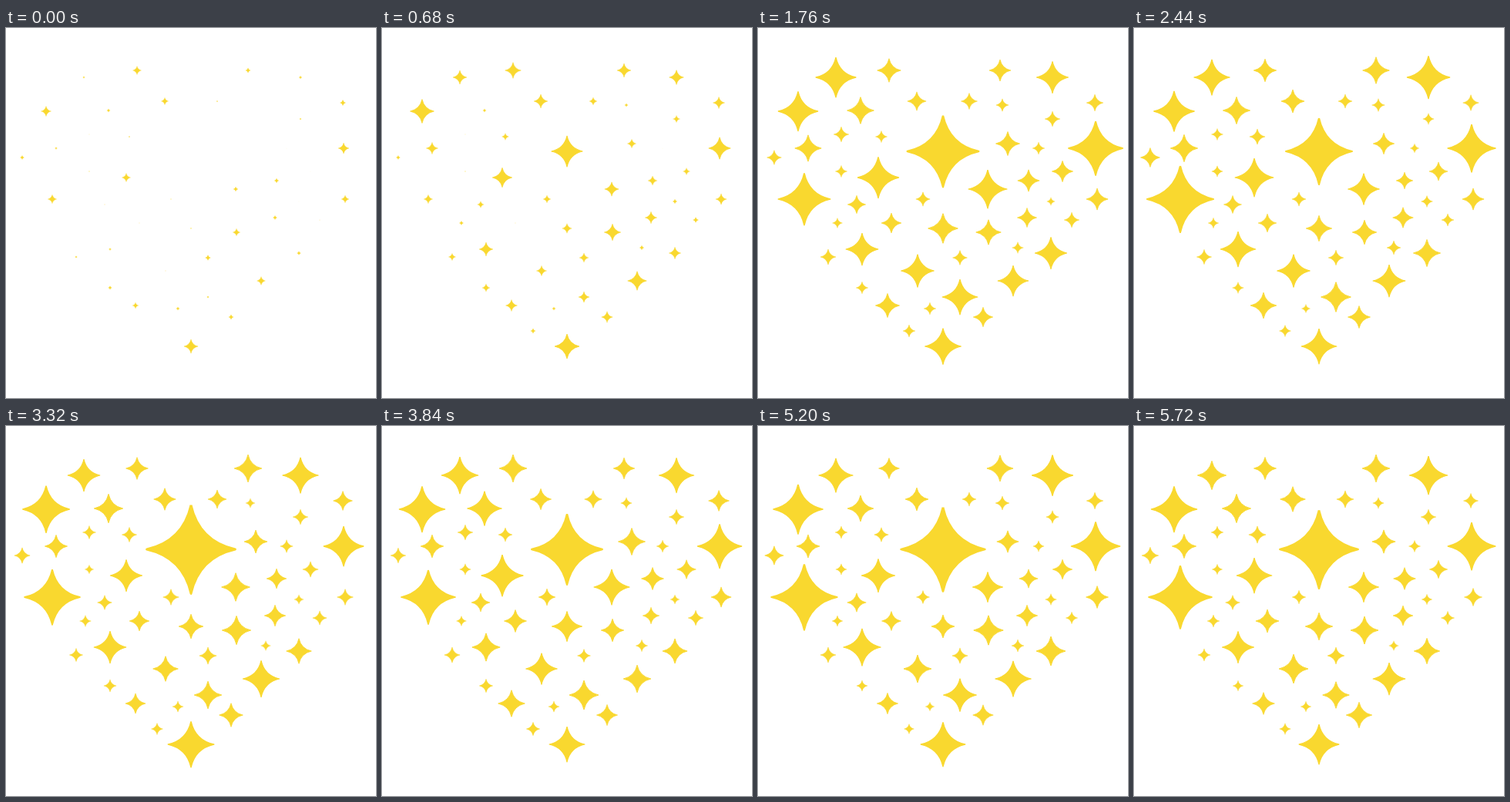
Recreate the animation shown at these times as an HTML page with a canvas. Size 480x480 px, loop 5.76 s.

```html
<!DOCTYPE html>
<html lang="en">
<head>
<meta charset="utf-8">
<title>Twinkling heart</title>
<style>
html, body { margin: 0; width: 100%; height: 100%; overflow: hidden; background: #fff; }
canvas { display: block; width: 100vw; height: 100vh; }
</style>
</head>
<body>
<canvas width="480" height="480"></canvas>
<script>
const LOOP = 5760, STEP = 40, COLOR = '#f9d82f', LATE = 700;
const ctx = document.querySelector('canvas').getContext('2d');

// Star centres from the largest to the smallest, some with a delay
const points = [
  [240, 160], [60, 222, LATE], [438, 156], [52, 108], [240, 413], [156, 194], [382, 64],
  [101, 64], [331, 328], [298, 209], [135, 287], [207, 315], [262, 349], [133, 107, LATE],
  [380, 292], [240, 260], [299, 265], [65, 156], [314, 55], [170, 55], [168, 360],
  [324, 150], [292, 375], [206, 95], [349, 246], [440, 222], [173, 253, LATE], [351, 198],
  [395, 186], [437, 97], [128, 229], [274, 95], [21, 168, LATE], [214, 222], [262, 298],
  [91, 297], [160, 141], [382, 118], [407, 249], [108, 138, LATE], [135, 337], [196, 393],
  [337, 285], [317, 100], [364, 156, LATE], [108, 186, LATE], [103, 253], [223, 364, LATE],
  [380, 225]
];

let seed = 7;
const random = () => (seed = seed * 16807 % 2147483647) / 2147483647;
const smooth = (a, b, t) => {
  const u = Math.min(1, Math.max(0, (t - a) / (b - a)));
  return u * u * (3 - 2 * u);
};

// Most sizes fall off slowly with rank; the first few stand out
const sizeOf = rank => 28.5 * Math.exp(-.0305 * rank) + 21 * Math.exp(-.75 * rank);

function wave(amount, period) {
  const phase = random() * 2 * Math.PI, speed = 2 * Math.PI / (period * (.8 + .4 * random()));
  return t => amount * Math.sin(t * speed + phase);
}

const stars = points.map(([x, y, delay = 0], rank) => {
  const size = sizeOf(rank), start = .4 * random() ** 1.5;
  const slow = wave(.13, 2600), quick = wave(.07, 1500);
  const radius = t => {
    const grown = smooth(400 + delay, 1060 + delay, t);
    return size * (start + (1 + slow(t) + quick(t) - start) * grown);
  };
  return { x, y, radius };
});

function drawStar(x, y, r) {
  const p = r * .975, c = r * .18;
  ctx.beginPath();
  ctx.moveTo(x, y - p);
  ctx.quadraticCurveTo(x + c, y - c, x + p, y);
  ctx.quadraticCurveTo(x + c, y + c, x, y + p);
  ctx.quadraticCurveTo(x - c, y + c, x - p, y);
  ctx.quadraticCurveTo(x - c, y - c, x, y - p);
  ctx.lineWidth = r * .05;
  ctx.fill();
  ctx.stroke();
}

ctx.fillStyle = ctx.strokeStyle = COLOR;
ctx.lineJoin = 'round';
const begin = performance.now();

function draw() {
  const t = Math.floor((performance.now() - begin) % LOOP / STEP) * STEP;
  ctx.clearRect(0, 0, 480, 480);
  for (const s of stars) drawStar(s.x, s.y, s.radius(t));
  requestAnimationFrame(draw);
}
draw();
</script>
</body>
</html>
```
